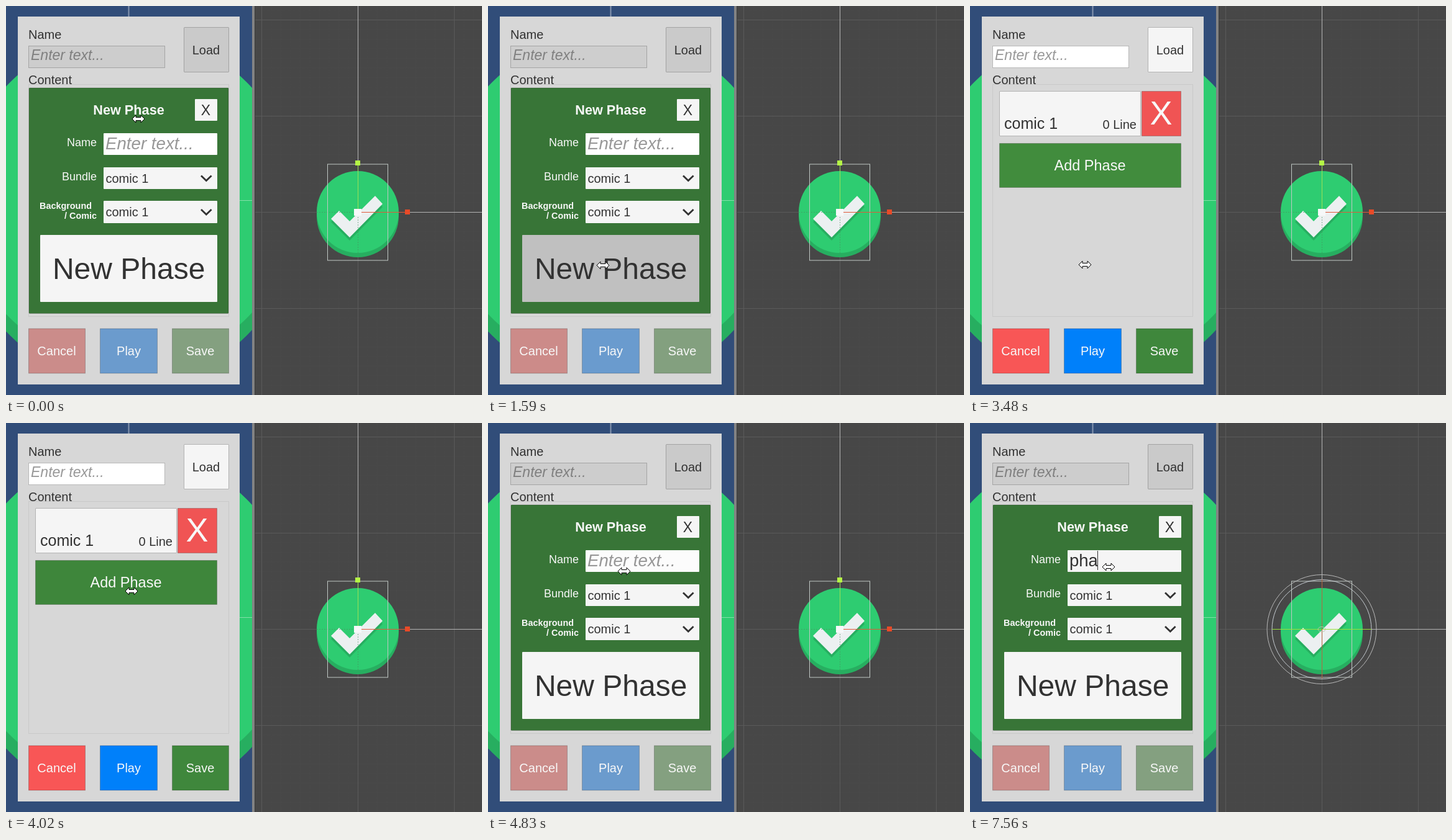
Write an HTML page that moves like this. It is 766x627 px and loops after 8000 ms.

```html
<!DOCTYPE html>
<html lang="en">
<head>
<meta charset="utf-8">
<title>New Phase dialog</title>
<style>
  html, body { margin: 0; width: 100%; height: 100%; overflow: hidden; background: #474747; }
  svg { display: block; width: 766px; height: 627px; font: 20px "Liberation Sans", Arial, sans-serif; fill: #323232; }
  .light { fill: #f8f8f8; }
  .mid { text-anchor: middle; }
  .end { text-anchor: end; }
  .hint { font-style: italic; fill-opacity: .5; }
  .bold { font-weight: bold; }
  .box { fill: #f5f5f5; }
  .edge { stroke: #000; stroke-opacity: .22; }
  .line { fill: none; stroke-width: 1; }
</style>
</head>
<body>
<svg viewBox="0 0 766 627">
  <defs>
    <clipPath id="gameView"><rect width="396" height="627"/></clipPath>
  </defs>

  <!-- Game view -->
  <g clip-path="url(#gameView)">
    <rect width="396" height="627" fill="#314d79"/>
    <circle cx="197" cy="341" r="269" fill="#27ae60"/>
    <circle cx="197" cy="313" r="269" fill="#2ecc71"/>
    <path d="M197.5 0V17" stroke="#8696b0" stroke-width="2"/>
    <path d="M376 313.5H396" stroke="#85dfa9"/>
  </g>

  <!-- Scene view -->
  <rect x="396" width="4" height="627" fill="#838383"/>
  <rect x="400" width="1" height="627" fill="#3c3c3c"/>
  <path id="minorGrid" class="line" stroke="#4b4b4b" stroke-dasharray="1 1"/>
  <path class="line" stroke="#5a5a5a" d="M411.5 0V627M566.5 0V627M721.5 0V627M401 22.5H766M401 177.5H766M401 332.5H766M401 487.5H766"/>
  <path class="line" stroke="#b4b4b4" d="M566.5 0V255M614 332.5H766"/>
  <circle cx="566" cy="339" r="66" fill="#27ae60"/>
  <circle cx="566" cy="332" r="66" fill="#2ecc71"/>
  <path id="tickShade" fill="#27ae60" transform="translate(0 5)" d="M523 343L536 330L553 347L594 306L606 319L553 373Z"/>
  <path fill="#ecf0f1" d="M523 343L536 330L553 347L594 306L606 319L553 373Z"/>
  <path class="line" stroke="#4a8a5c" stroke-opacity=".6" stroke-dasharray="2 2" d="M500 332.5H560M566.5 340V398"/>
  <rect class="line" x="517.5" y="255" width="97" height="155" stroke="#c0c8c4"/>
  <g id="scaleTool">
    <path class="line" stroke="#9be056" d="M566.5 257V327"/>
    <path class="line" stroke="#e2583a" d="M572 332.5H642"/>
    <rect x="562" y="249" width="8" height="8" fill="#b4f545"/>
    <rect x="642" y="328" width="8" height="8" fill="#e84a28"/>
    <rect x="560" y="327" width="12" height="11" fill="#f6f8f9"/>
  </g>
  <g id="rotateTool" class="line">
    <circle cx="566" cy="332.5" r="88" stroke="#b8b8b8"/>
    <circle cx="566" cy="332.5" r="80" stroke="#c4cad0"/>
    <path stroke="#9be03c" d="M486 332.5H646"/>
    <path stroke="#b5653f" d="M566.5 252V412"/>
    <ellipse cx="566" cy="332.5" rx="6" ry="4" stroke="#b9c4ae"/>
  </g>

  <!-- Main panel -->
  <rect x="19" y="17" width="357" height="593" fill="#d7d7d7"/>
  <text x="36" y="53">Name</text>
  <rect id="title" class="edge" x="36.5" y="64.5" width="219" height="35"/>
  <text class="hint" x="40" y="87" font-size="23">Enter text...</text>
  <rect id="load" class="edge" x="286.5" y="34.5" width="72" height="72" rx="1"/>
  <text class="mid" x="322" y="78">Load</text>
  <rect class="line" x="36.5" y="126.5" width="322" height="374" stroke="#c9c9c9"/>
  <text x="36" y="126">Content</text>
  <rect id="cancel" class="edge" x="36.5" y="520" width="91" height="72"/>
  <rect id="play" class="edge" x="151.5" y="520" width="92" height="72"/>
  <rect id="save" class="edge" x="267.5" y="520" width="91" height="72"/>
  <g class="light mid">
    <text x="81.5" y="563">Cancel</text>
    <text x="197.5" y="563">Play</text>
    <text x="312.5" y="563">Save</text>
  </g>

  <g id="list">
    <rect class="box edge" x="47.5" y="137.5" width="227" height="72" rx="1"/>
    <text x="55" y="198" font-size="25">comic 1</text>
    <text class="end" x="268" y="198">0 Line</text>
    <rect class="edge" x="276.5" y="137.5" width="63" height="72" fill="#f05454"/>
    <text class="light mid" x="307.5" y="191" font-size="54">X</text>
    <rect id="addPhase" class="edge" x="47.5" y="221.5" width="292" height="71"/>
    <text class="light mid" x="193" y="265" font-size="23.5">Add Phase</text>
  </g>

  <!-- Phase dialog -->
  <g id="dialog">
    <rect class="edge" x="37" y="132" width="321" height="363.5" rx="1" fill="#387537"/>
    <g class="light">
      <text class="mid bold" x="197.5" y="175" font-size="21.7">New Phase</text>
      <g class="end" font-size="18">
        <text x="146" y="226">Name</text>
        <text x="146" y="281">Bundle</text>
      </g>
      <g class="end bold" font-size="14.4">
        <text x="138" y="327">Background</text>
        <text x="146" y="343">/ Comic</text>
      </g>
    </g>
    <rect class="box" x="304" y="150" width="36" height="35" rx="1"/>
    <text class="mid" x="321.5" y="176" font-size="23">X</text>
    <rect id="field" x="157" y="205" width="183" height="35" rx="1"/>
    <text id="fieldHint" class="hint" x="160" y="231" font-size="27.7">Enter text...</text>
    <text id="typed" x="160" y="231" font-size="27.5"></text>
    <rect id="caret" y="206" width="1" height="31"/>
    <rect id="bundle" x="157" y="260" width="183" height="35" rx="1"/>
    <text x="160.5" y="285">comic 1</text>
    <rect class="box" x="157" y="314" width="183" height="36" rx="1"/>
    <text x="160.5" y="339">comic 1</text>
    <path class="line" style="stroke-width:2.8" stroke="#323232" d="M314 273.5L322.3 281.5L330.6 273.5M314 328L322.3 336L330.6 328"/>
    <rect id="newPhase" x="55" y="369" width="285" height="108" rx="1"/>
    <text class="mid" x="197.7" y="440" font-size="48">New Phase</text>
  </g>

  <path id="cursor" fill="#fff" stroke="#000" d="M-10 0L-4 -6V-2.5H4V-6L10 0L4 6V2.5H-4V6Z"/>
</svg>

<script>
const LOOP = 8000, CLOSE = 1605, OPEN = 4320, ROTATE = 6870;
const HOVER = 0.96, PRESS = 0.784;
const $ = id => document.getElementById(id);

// Key lists hold [time, value] pairs.
const track = (keys, t, ease = k => k) => {
  const i = keys.findIndex(key => key[0] > t);
  if (i < 0) return keys.at(-1)[1];
  if (i === 0) return keys[0][1];
  const [t0, a] = keys[i - 1], [t1, b] = keys[i];
  return a + (b - a) * ease((t - t0) / (t1 - t0));
};
const smooth = k => k * k * (3 - 2 * k);

const cursorX = [[660, 213], [1290, 185], [3450, 185], [4080, 202], [4440, 202], [4980, 223]];
const cursorY = [[660, 182], [1290, 418], [3450, 418], [4080, 267], [4440, 267], [4980, 232]];
const disabled = [[1590, 1], [1680, 0], [OPEN, 0], [OPEN + 100, 1]];

// Enabled and disabled colour of each control on the main panel.
const controls = {
  title: ["#ffffff", "#cdcdcd"],
  load: ["#f5f5f5", "#cacaca"],
  cancel: ["#f85656", "#cb8c8a"],
  play: ["#0080fa", "#6b9bcd"],
  save: ["#3f873c", "#84a080"]
};

// Base colour and brightness keys of the controls that react to the pointer.
const reactive = {
  newPhase: ["#f5f5f5", [[1095, 1], [1195, HOVER], [1490, HOVER], [1590, PRESS], [CLOSE, PRESS], [CLOSE, 1]]],
  addPhase: ["#418c3d", [[3905, 1], [4005, HOVER], [4280, HOVER], [4380, PRESS]]],
  bundle: ["#f5f5f5", [[OPEN, 1], [4420, HOVER], [4596, HOVER], [4696, 1]]],
  field: ["#ffffff", [[4800, 1], [4900, HOVER], [5180, HOVER], [5270, PRESS], [5340, HOVER]]]
};

const typing = [[0, ""], [6000, "p"], [6270, "ph"], [6360, "pha"], [6540, "phas"], [6870, "phase"], [7380, "phas"], [7560, "pha"]];

const mix = (a, b, k) => `color-mix(in srgb, ${a}, ${b} ${k * 100}%)`;
const show = (id, on) => { $(id).style.display = on ? "" : "none"; };

let grid = "";
for (let x = 411.5; x < 766; x += 15.5) grid += `M${x} 0V627`;
for (let y = 7; y < 627; y += 15.5) grid += `M401 ${y}H766`;
$("minorGrid").setAttribute("d", grid);

function draw(t) {
  const open = t < CLOSE || t >= OPEN;
  show("dialog", open);
  show("list", !open);
  show("scaleTool", t < ROTATE);
  show("rotateTool", t >= ROTATE);

  const off = track(disabled, t);
  for (const id in controls) $(id).style.fill = mix(...controls[id], off);
  for (const id in reactive) {
    const [color, keys] = reactive[id];
    $(id).style.fill = mix(color, "black", 1 - track(keys, t));
  }

  const text = typing.findLast(key => key[0] <= t)[1];
  $("typed").textContent = text;
  show("fieldHint", !text);
  show("caret", text || (t >= 5250 && t < 5730));
  const width = [...text].reduce((sum, c) => sum + (c === "s" ? 0.5 : 0.556), 0) * 27.5;
  $("caret").setAttribute("x", Math.floor(160 + width));

  const x = Math.round(track(cursorX, t, smooth)), y = Math.round(track(cursorY, t, smooth));
  $("cursor").setAttribute("transform", `translate(${x} ${y})`);
}

const start = performance.now();
function frame() {
  draw((performance.now() - start) % LOOP);
  requestAnimationFrame(frame);
}
frame();
</script>
</body>
</html>
```
